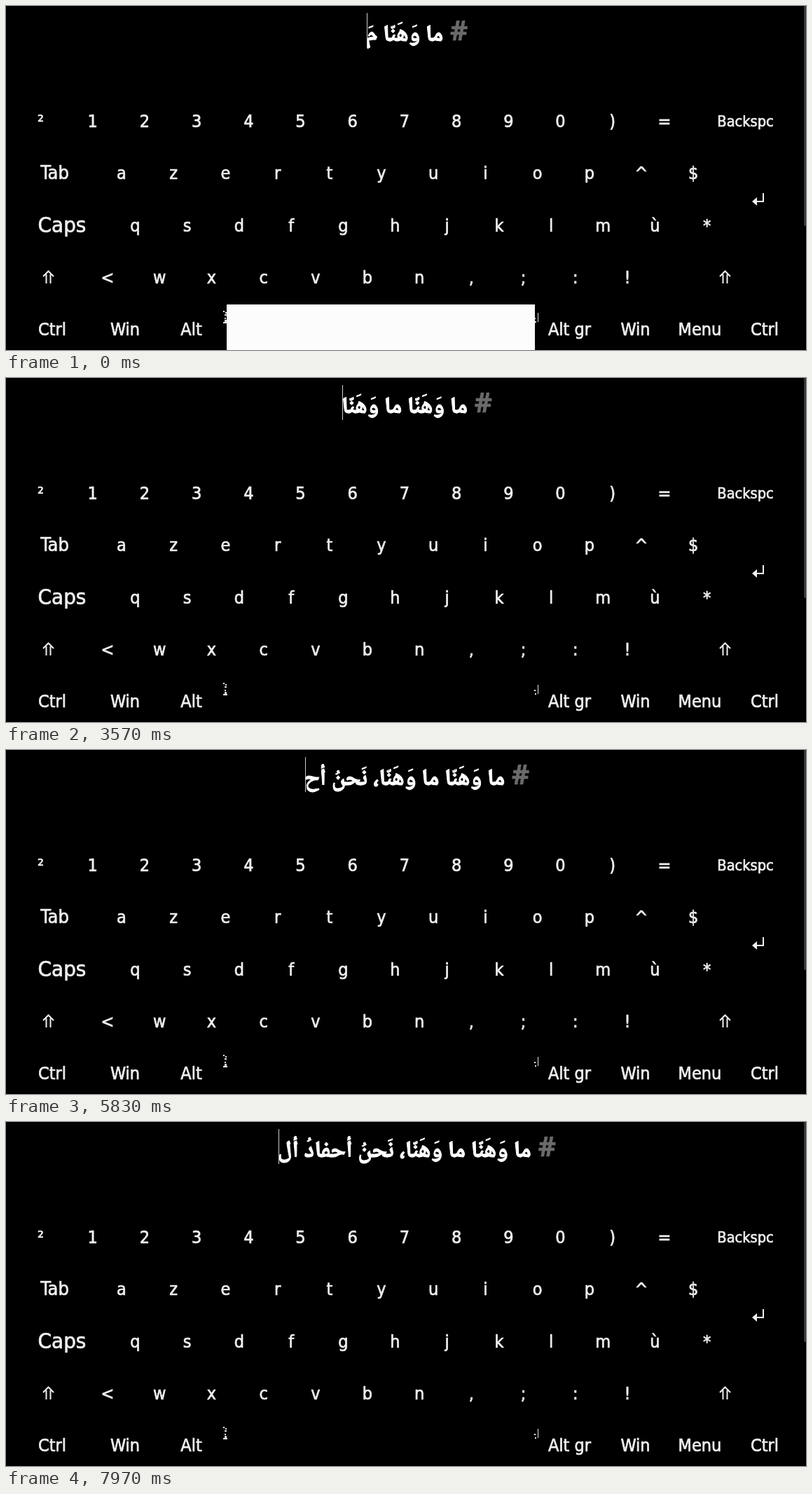
An HTML page for the animation above (8000 ms loop, 1142 by 491 pixels).

```html
<!DOCTYPE html>
<html lang="en">
<head>
<meta charset="utf-8">
<title>Typing on a keyboard</title>
<style>
html, body { margin: 0; width: 100%; height: 100%; overflow: hidden; background: #000; }
svg { display: block; width: 1142px; height: 491px; }
#labels { font: 25px "DejaVu Sans Condensed", Roboto, sans-serif; fill: #f0f0f0; stroke: #f0f0f0; stroke-width: .7; text-anchor: middle; }
#typed { font: bold 36px "Noto Naskh Arabic", "Noto Sans Arabic", "DejaVu Sans", serif; fill: #fff; stroke: #fff; stroke-width: 1; direction: rtl; text-anchor: start; }
#hash { font: bold 39px "Noto Sans", "Open Sans", sans-serif; fill: #6a6a6a; stroke: #6a6a6a; stroke-width: .6; text-anchor: end; }
.icon { fill: none; stroke: #f0f0f0; stroke-width: 2; }
</style>
</head>
<body>
<svg viewBox="0 0 1142 491">
  <rect x="1139" width="3" height="314" rx="1" fill="#383838"/>
  <g id="labels"></g>
  <g class="icon">
    <path id="shift" d="M53 386 60.500 378.500 68 386M57.500 396V383M63.500 396V383"/>
    <use href="#shift" x="966"/>
    <path d="M1081 267V279H1069"/>
    <path d="M1065 279 1072 273V285Z" fill="#f0f0f0" stroke="none"/>
  </g>
  <path fill="#e8e8e8" d="M310 435h2v2h-2zM313 437h2v2h-2zM312 440h3v2h-3zM312 445h2v2h-2zM312 448h3v4h-3zM310 451h6v2h-6zM759 438h1v13h-1zM754 445h2v2h-2zM755 450h2v2h-2z"/>
  <g id="lit" fill="#fcfcfc"></g>
  <text id="hash" y="49">#</text>
  <text id="typed" y="50"></text>
  <rect id="caret" y="10" width="1" height="50" fill="#ccc"/>
</svg>
<script>
const NS = 'http://www.w3.org/2000/svg';
const el = id => document.getElementById(id);
const make = (tag, attrs, parent) => {
  const node = document.createElementNS(NS, tag);
  for (const k in attrs) node.setAttribute(k, attrs[k]);
  return parent.appendChild(node);
};

const LOOP = 8000, PRESS = 90, BLINK = 530, MID = 587, PITCH = 74.2;
const keys = { ' ': { x: 315, y: 426, width: 440, height: 65 } };

function label(text, x, y, size = 25) {
  make('text', { x, y, style: `font-size:${size}px` }, el('labels')).textContent = text;
}

// Rows of square keys: labels, centre of the first key, baseline
[['²1234567890)=', 49.5, 173], ['azertyuiop^$', 165, 247],
 ['qsdfghjklmù*', 184.5, 322], ['<wxcvbn,;:!', 145, 396]].forEach(([chars, x0, y], row) => {
  [...chars].forEach((c, i) => {
    const x = x0 + i * PITCH;
    label(c, x, y);
    keys[c] = { x: Math.round(x - 35.5), y: 130 + row * 74, width: 71, height: 70 };
  });
});
label('Backspc', 1055.5, 172, 21.6);
label('Tab', 69.5, 247, 27);
label('Caps', 80, 323, 31);
[['Ctrl', 66], ['Win', 170], ['Alt', 264.5], ['Alt gr', 804.5],
 ['Win', 898.5], ['Menu', 990.5], ['Ctrl', 1083]].forEach(([t, x]) => label(t, x, 470));

const A = '\u064e', U = '\u064f', SH = '\u0651';
// Time of press, key, text added on release, characters removed first
const strokes = [
  [-40, ' ', 'ا ', 1], [500, 'w', 'و'], [880, 'a', A], [1030, 'h', 'ه'], [1140, 'a', A],
  [1260, 'n', 'ن'], [1400, 'n', SH], [2200, 'a', A], [3050, ' ', 'ا ', 1],
  [3640, ',', '،', 1], [3800, ' ', ' '], [3960, 'n', 'ن'], [4130, 'a', A], [4300, 'h', 'ح'],
  [4560, 'n', 'ن'], [4760, 'o', U], [4960, ' ', ' '], [5260, 'a', 'أ'], [5560, 'h', 'ح'],
  [5880, 'f', 'ف'], [6060, 'a', A], [6240, 'a', 'ا', 1], [6450, 'd', 'د'],
  [6800, 'o', U], [7100, ' ', ' '], [7560, 'a', 'أ'], [7740, 'l', 'ل']
];
const first = `ما و${A}ه${A}ن${SH}ا م${A}`;
let line = first;
const states = strokes.map(([t, key, add, cut = 0]) => {
  line = line.slice(0, line.length - cut) + add;
  return { t, key, text: line.trim() };
});

const typed = el('typed'), hash = el('hash'), caret = el('caret');
const lit = make('rect', {}, el('lit'));

// One font size for the whole line, whichever Arabic face is present
typed.textContent = line;
typed.style.fontSize = 36 * 362 / typed.getComputedTextLength() + 'px';

let shown = null;
function setText(text) {
  if (text === shown) return;
  shown = text;
  typed.textContent = text;
  const half = (typed.getComputedTextLength() + 34) / 2;
  hash.setAttribute('x', MID + half);
  typed.setAttribute('x', MID + half - 35);
  caret.setAttribute('x', Math.round(MID - half));
}

function draw(now) {
  const t = now % LOOP;
  let text = first, last = 0, down = null;
  for (const s of states) {
    if (t < s.t) break;
    if (t < s.t + PRESS) down = keys[s.key];
    else { text = s.text; last = s.t + PRESS; }
  }
  setText(text);
  caret.style.opacity = down || (t - last) % (2 * BLINK) < BLINK ? 1 : 0;
  lit.style.display = down ? '' : 'none';
  for (const k in down) lit.setAttribute(k, down[k]);
}

const start = performance.now();
function tick() {
  draw(performance.now() - start);
  requestAnimationFrame(tick);
}
draw(0);
requestAnimationFrame(tick);
</script>
</body>
</html>
```
